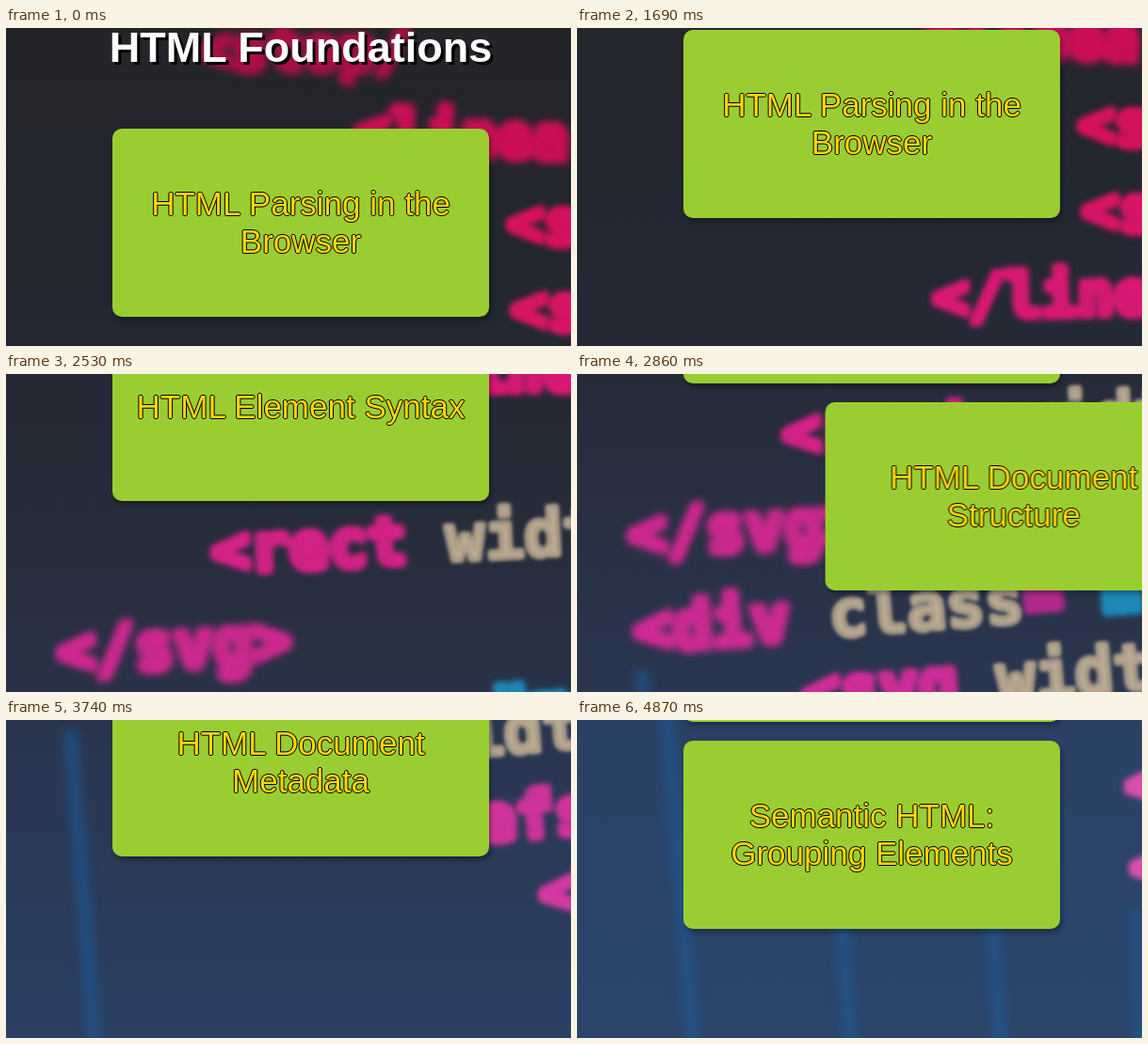
An HTML page with a canvas that plays this animation: 600x338 px, repeating every 5.24 s.

```html
<!DOCTYPE html>
<html lang="en">
<head>
<meta charset="utf-8">
<title>HTML Foundations</title>
<style>
  html, body { margin: 0; width: 100%; height: 100%; overflow: hidden; background: #232429; }
  #stage { position: relative; width: 600px; height: 338px; overflow: hidden; }
  #page { position: absolute; left: 0; top: 0; width: 600px; height: 1523px; will-change: transform;
    font-family: "Liberation Sans", Arial, sans-serif; }
  canvas { position: absolute; left: 0; top: 0; }
  h1 { position: absolute; left: 13px; top: -5px; width: 600px; margin: 0; text-align: center;
    font-size: 45px; line-height: 52px; color: #fff; text-shadow: 3px 3px 0 #000; }
  .box { position: absolute; left: 113px; width: 400px; height: 200px; display: flex;
    align-items: center; justify-content: center; border-radius: 10px; background: #9acd32;
    box-shadow: 2px 4px 5px rgba(0, 0, 0, .3); }
  h2 { margin: 0; font-size: 35px; line-height: 40px; font-weight: 400; text-align: center;
    color: #ffd700; text-shadow: -1px 0 #000, 0 1px #000, 1px 0 #000, 0 -1px #000; }
</style>
</head>
<body>
<div id="stage"><div id="page">
  <canvas id="photo" width="600" height="1523"></canvas>
  <h1>HTML Foundations</h1>
</div></div>
<script>
const LOOP = 5240;
const page = document.getElementById('page');

// [label, time it slides in]
const boxes = [
  ['HTML Parsing in the Browser', null],
  ['HTML Element Syntax', 1964.5],
  ['HTML Document Structure', 2608],
  ['HTML Document Metadata', 3215],
  ['Semantic HTML: Sections', 3849],
  ['Semantic HTML: Grouping Elements', 4421]
];

// [time, scroll offset, speed]
const scrollKeys = [
  [1230, 1, .05], [2130, 254, .28], [2860, 517, .355],
  [3740, 822, .36], [4370, 1064, .36], [4870, 1185, 0]
];

function scrollAt(t) {
  if (t < scrollKeys[0][0]) return 0;
  const i = scrollKeys.findIndex(k => k[0] > t);
  if (i < 0) return scrollKeys[scrollKeys.length - 1][1];
  const [t0, s0, v0] = scrollKeys[i - 1], [t1, s1, v1] = scrollKeys[i];
  const d = t1 - t0, u = (t - t0) / d, w = 1 - u;
  return s0 * (1 + 2 * u) * w * w + s1 * u * u * (3 - 2 * u) + d * u * w * (v0 * w - v1 * u);
}

function paintBackdrop() {
  const c = document.getElementById('photo').getContext('2d');
  const sky = c.createLinearGradient(0, 0, 0, 1523);
  [[0, '#242529'], [300, '#232731'], [560, '#272c3b'], [850, '#2a3650'],
   [1100, '#2a3e60'], [1300, '#2b4368'], [1523, '#2c456b']]
    .forEach(([y, col]) => sky.addColorStop(y / 1523, col));
  c.fillStyle = sky;
  c.fillRect(0, 0, 600, 1523);

  // indentation guides
  c.filter = 'blur(5px)';
  c.lineWidth = 16;
  c.strokeStyle = 'rgba(28, 92, 152, .55)';
  [[68, 832, 84, 1040, 124, 1540], [279, 1358, 283, 1430, 291, 1540],
   [437, 1328, 442, 1420, 451, 1540], [594, 1385, 596, 1450, 599, 1540]].forEach(p => {
    c.beginPath();
    c.moveTo(p[0], p[1]);
    c.quadraticCurveTo(p[2], p[3], p[4], p[5]);
    c.stroke();
  });

  // out-of-focus code: [text, x, baseline, size, tilt in degrees, colour, blur]
  const beige = '#bcab92';
  c.lineJoin = 'round';
  [
    ['<stop/', 202, 44, 63, 0, '#ac0f48', 5],
    ['<linea', 369, 130, 63, 2.5, '#cc0f56', 4],
    ['<s', 532, 230, 65, 0, '#d5125d', 3],
    ['<s', 536, 321, 65, 0, '#d81566', 3],
    ['</line', 378, 413, 64, -1, '#d81974', 3],
    ['</defs>', 216, 515, 69, -3, '#d61d7c', 3],
    ['<rect', 219, 604, 69, -3, '#d42286', 3],
    ['      widt', 219, 604, 69, -3, beige, 2],
    ['</svg>', 55, 711, 69, -3, '#ce2890', 4],
    ['<div', 62, 813, 69, -4.5, '#d02a94', 4],
    ['     class', 62, 813, 69, -4.5, beige, 2],
    ['          =', 62, 811, 69, -4.5, '#b02a8e', 3],
    ['           "m', 62, 810, 69, -4.5, '#1d8ab8', 3],
    ['<svg', 240, 881, 69, -4.5, '#d02d98', 3],
    ['     width', 240, 881, 69, -4.5, beige, 2],
    ['<defs', 421, 959, 68, -5, '#d0339c', 3],
    ['<l', 568, 1030, 69, -5, '#d43aa2', 3],
    ['<', 584, 1278, 69, -5, '#d94fae', 3],
    ['<', 589, 1365, 69, -5, '#d94fae', 3]
  ].forEach(([text, x, y, size, tilt, col, blur]) => {
    c.save();
    c.translate(x, y);
    c.rotate(tilt * Math.PI / 180);
    c.font = `bold ${size}px "DejaVu Sans Mono", monospace`;
    c.filter = `blur(${blur}px)`;
    c.fillStyle = c.strokeStyle = col;
    c.lineWidth = col === beige ? 4 : 8;
    c.strokeText(text, 0, 0);
    c.fillText(text, 0, 0);
    c.restore();
  });
}

paintBackdrop();

const slides = [];
boxes.forEach(([label, start], i) => {
  const box = document.createElement('div');
  const head = document.createElement('h2');
  box.className = 'box';
  box.style.top = 107 + 220 * i + 'px';
  head.textContent = label;
  box.append(head);
  page.append(box);
  if (start === null) return;
  const from = i % 2 ? -1600 : 1600;
  const slide = box.animate(
    { transform: [`translateX(${from}px)`, 'translateX(0)'] },
    { delay: start, duration: 400, easing: 'ease', fill: 'both' });
  slide.pause();
  slides.push(slide);
});

const origin = performance.now();

function draw() {
  const t = (performance.now() - origin) % LOOP;
  page.style.transform = `translateY(${-Math.floor(scrollAt(t))}px)`;
  slides.forEach(s => { s.currentTime = t; });
  requestAnimationFrame(draw);
}
draw();
</script>
</body>
</html>
```
